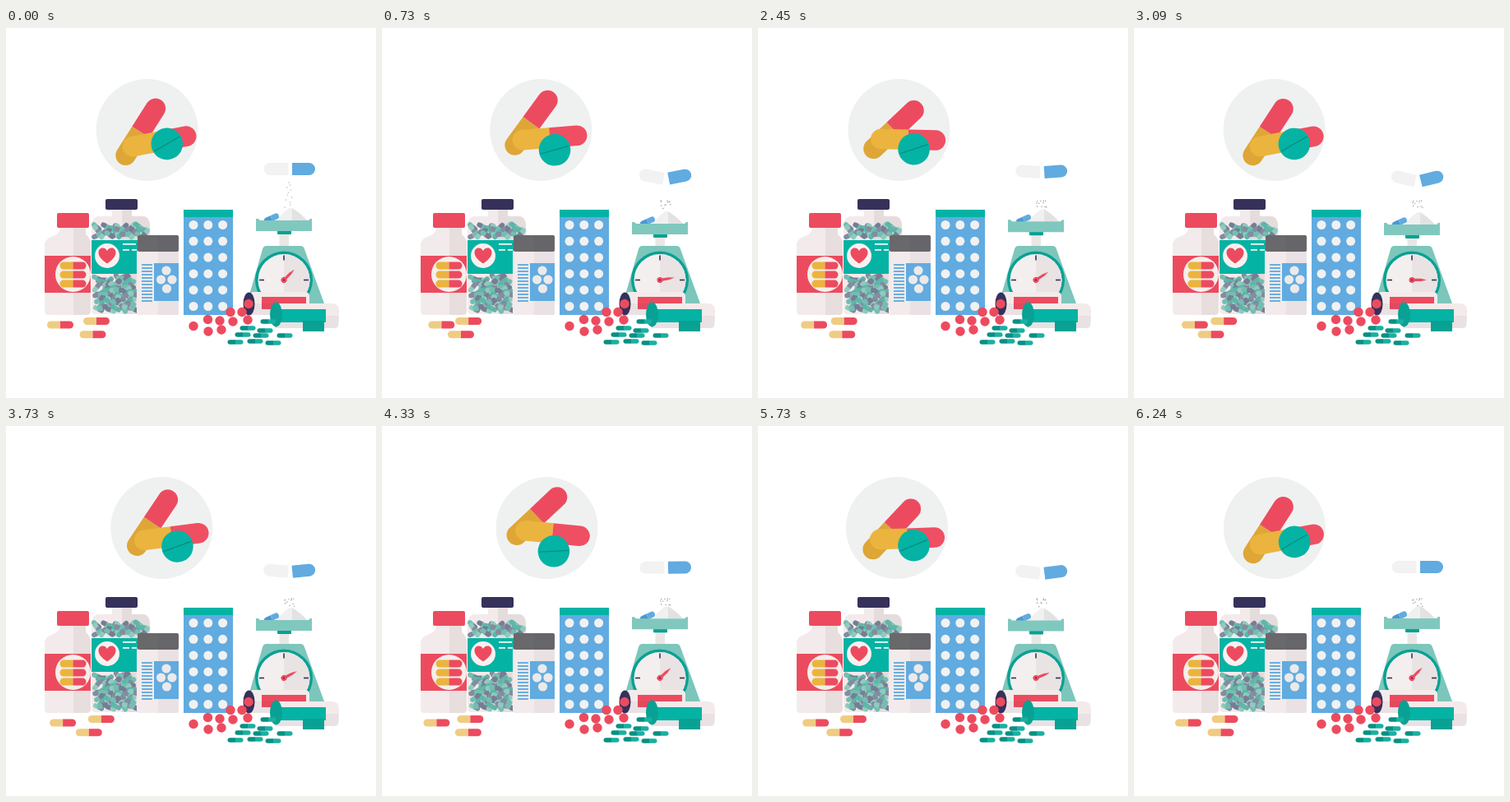
Recreate the animation shown at these times as an HTML page. Size 450 by 450 pixels, loop 6.27 s.

```html
<!DOCTYPE html>
<html lang="en">
<head>
<meta charset="utf-8">
<style>
html, body { margin: 0; width: 100%; height: 100%; overflow: hidden; background: #fff; }
svg { display: block; width: 100vw; height: 100vh; }
</style>
</head>
<body>
<svg id="stage" viewBox="0 0 450 450"></svg>
<script>
const LOOP = 6270, TAU = Math.PI * 2;
const C = {
  red: '#ec4b5f', yellow: '#ebb43e', teal: '#04b3a4', deep: '#08a193', blue: '#61abe0',
  navy: '#35315a', white: '#f3ebeb', grey: '#69686b', pale: '#eff1f1'
};

const rect = (x, y, w, h, fill, r = 0, extra = '') =>
  `<rect x="${x}" y="${y}" width="${w}" height="${h}" rx="${r}" fill="${fill}" ${extra}/>`;
const disc = (x, y, r, fill) => `<circle cx="${x}" cy="${y}" r="${r}" fill="${fill}"/>`;
const oval = (x, y, rx, ry, fill) => `<ellipse cx="${x}" cy="${y}" rx="${rx}" ry="${ry}" fill="${fill}"/>`;
const path = (d, fill, extra = '') => `<path d="${d}" fill="${fill}" ${extra}/>`;
const shade = (x, y, w, h) => rect(x, y, w, h, '#302d50', 0, 'opacity=".05"');
const group = (id, body) => `<g id="${id}">${body}</g>`;

// Two-coloured capsule centred on the origin.
function capsule(len, r, left, right) {
  const c = len / 2 - r;
  return path(`M0 ${-r}H${-c}a${r} ${r} 0 0 0 0 ${2 * r}H0z`, left) +
    path(`M0 ${-r}H${c}a${r} ${r} 0 0 1 0 ${2 * r}H0z`, right);
}
const at = (x, y, body, turn = 0) => `<g transform="translate(${x} ${y}) rotate(${turn})">${body}</g>`;

let seed = 17;
const random = () => (seed = (seed * 16807) % 2147483647) / 2147483647;

// Capsules tumbled over a loose grid.
function scatter(x, y, w, h, cols, rows) {
  const tones = ['#74beb1', '#777d95', '#5fb5a7', '#858ba0', '#8fcabf'];
  let out = '';
  for (let i = 0; i < cols * rows; i++) {
    const px = x + (i % cols + random()) * w / cols, py = y + (Math.floor(i / cols) + random()) * h / rows;
    out += at(px, py, capsule(14, 3, tones[i % 5], tones[(i * 3 + 1) % 5]), random() * 120 - 60);
  }
  return out;
}

function redBottle() {
  let out = path('M66 242H97V251Q103 255 103 264V344Q103 349 98 349H52Q47 349 47 344V264Q47 257 55 254Q66 251 66 242z', C.white);
  out += path('M82 242H97V251Q103 255 103 264V344Q103 349 98 349H82z', '#e8dede');
  out += rect(47, 277, 56, 45, C.red) + rect(62, 225, 39, 18, C.red, 2);
  out += disc(81.5, 299.5, 21.5, '#f5eeea');
  for (const y of [289, 300, 311]) out += at(81.5, y, capsule(32, 4.5, C.yellow, C.red));
  return out;
}

function heartBottle() {
  let out = path('M129 220H153V229H168Q175 231 175 241V343Q175 348 170 348H109Q104 348 104 343V241Q104 231 111 229H129z', C.white);
  out += path('M141 220H153V229H168Q175 231 175 241V348H141z', '#e5dcdd');
  out += scatter(110, 241, 60, 12, 9, 3) + scatter(110, 303, 46, 41, 7, 8);
  out += rect(104, 258, 70, 41, C.teal) + rect(121, 208, 39, 13, C.navy, 2);
  out += disc(123, 277, 15, '#f7f1f0');
  out += path('M123 286.500C115 281 112.500 277 112.500 273C112.500 267 120 265.500 123 271C126 265.500 133.500 267 133.500 273C133.500 277 131 281 123 286.500z', C.red);
  return out + rect(142, 262, 16, 1.8, '#e6f5f2') + rect(142, 269, 8, 1.8, '#e6f5f2') + rect(153, 269, 6, 1.8, '#e6f5f2');
}

function stripedBottle() {
  let out = rect(159, 270, 51, 79, C.white, 3) + rect(160, 252, 50, 20, C.grey, 2);
  out += shade(185, 252, 25, 97) + rect(180, 286, 30, 46, C.blue);
  for (let i = 0; i < 12; i++) out += rect(165, 287 + i * 4, 13, 2, '#69afe0');
  for (const [x, y] of [[195, 295], [188.5, 306], [202, 306], [195.5, 317]])
    out += disc(x, y, 5.6, '#ece9ea');
  return out;
}

function blister() {
  let out = rect(216, 221, 60, 128, C.blue) + rect(216, 221, 60, 9, C.teal);
  for (let i = 0; i < 18; i++)
    out += disc(228 + (i % 3) * 17.8, 239.5 + Math.floor(i / 3) * 19.8, 5.5, '#f1f1f1');
  return out;
}

function scale() {
  let out = rect(332.5, 245, 11.5, 22, '#ebe6e6');
  out += group('tray',
    path('M328 234Q337 225 342 221Q346 217 350 221Q358 226 366 234z', '#f0f0f0') +
    path('M348 219Q358 225 366 234H348z', '#e3e2e3') +
    at(323, 231.5, capsule(19, 3.5, '#4b98d4', C.blue), -25) +
    rect(330, 246, 17, 5, C.deep, 1) +
    path('M304 232H307L309 234H368L370 232H372V247H304z', '#80c8be'));
  out += path('M317 265H358Q362 265 363 269L387 335H293L312 269Q313 265 317 265z', '#7cc6bc');
  out += disc(338, 306.5, 35, C.deep) + disc(338, 306.5, 31.5, '#f4efef');
  out += path('M338 275A31.500 31.500 0 0 1 338 338z', '#e9e3e4');
  for (let i = 0; i < 4; i++) out += at(338, 306.5, rect(-.8, -30, 1.6, 6, C.navy), i * 90);
  out += group('needle', path('M-3 -1.7L11 -1.6L18 0L11 1.6L-3 1.7z', C.red) + disc(0, 0, 3.5, C.red) + disc(0, 0, 1, C.navy));
  return out;
}

function lyingBottles() {
  let out = rect(296, 321, 73, 28, C.white, 5) + rect(311, 327, 54, 15, C.red);
  out += shade(296, 335, 73, 14) + oval(295.5, 335.5, 7, 14, C.navy);
  out += path('M327 335H397Q405 336 405 343V357Q405 365 397 365H327z', C.white) + shade(327, 350, 77, 15);
  out += rect(331, 342, 58, 16, C.teal) + rect(361, 356, 26, 13, C.deep);
  return out + oval(328.5, 348.5, 7.5, 15, C.deep);
}

function looseMedicine() {
  let out = '';
  for (const [x, y] of [[228, 362.5], [245.5, 354.5], [246, 369], [260, 356], [262, 367],
    [276, 357], [273, 345.5], [287, 345.5], [294, 355], [295, 335.5]]) out += disc(x, y, 5.7, C.red);
  for (const [x, y] of [[294, 365], [319, 357], [315, 368], [288, 373], [310, 374], [339, 374], [279, 382], [303, 381], [325, 383]])
    out += at(x, y, capsule(19, 2.8, '#079083', '#19b0a1'));
  return out;
}

const small = capsule(32, 4.5, '#efcc82', C.red);
const drops = Array.from({ length: 11 }, () => '<circle class="drop"/>').join('');

const stage = document.getElementById('stage');
stage.innerHTML =
  group('badge', disc(0, 0, 62, C.pale) +
    group('back', capsule(92, 12.3, '#dea636', C.red)) +
    group('front', capsule(91, 12.3, C.yellow, '#ef4f62')) +
    group('tablet', disc(0, 0, 19.3, C.teal) + rect(-18, -.6, 36, 1.2, '#078c81'))) +
  heartBottle() + redBottle() + stripedBottle() + blister() + scale() + lyingBottles() + looseMedicine() +
  group('p1', small) + group('p2', small) + group('p3', small) + drops +
  group('halfL', path('M14 -7.500H-8.500a7.500 7.500 0 0 0 0 15H14z', '#f2f2f3')) +
  group('halfR', path('M-13 -7.500H7.500a7.500 7.500 0 0 1 0 15H-13z', C.blue));

const part = {};
stage.querySelectorAll('[id]').forEach(e => part[e.id] = e);
const dropList = [...stage.querySelectorAll('.drop')];
const place = (id, x, y, turn = 0) =>
  part[id].setAttribute('transform', `translate(${x} ${y}) rotate(${turn})`);

function draw(t) {
  const slow = t / (LOOP / 2), quick = t / (LOOP / 3);
  const sway = (mid, amp, peak) => mid + amp * Math.cos(TAU * (slow - peak));

  place('badge', sway(184.2, 16.4, .39), 124);
  place('back', sway(-9.3, -3, .33), sway(-5.8, -9, .43), sway(-47, 12, .58));
  place('front', sway(10.3, -4.7, .5), sway(10, -4, .46), sway(0, 11.5, .55));
  const angle = sway(57, 22, .495), rad = angle * Math.PI / 180;
  place('tablet', 29.5 * Math.cos(rad), 29.5 * Math.sin(rad), (angle - 78) * .7);

  const cos = Math.cos(TAU * quick), open = (1 - cos) / 2;
  place('p1', 70 - 4 * cos, 361);
  place('p2', 110 - 6 * Math.sin(TAU * quick), 356.5);
  place('p3', 99.5 + 6 * cos, 372.7);
  place('halfL', 329.5 - open, 171.5 + 11.5 * open, 14 * open);
  place('halfR', 361 + .5 * open, 171.5 + 11.5 * open, -14 * open);
  place('tray', 0, 5 * open);
  place('needle', 338, 306.5, -45 + 45 * open);

  // Powder falls early in each pour, then the last grains hop on the heap.
  const pour = (t / (LOOP / 5)) % 1;
  const falling = pour < .36;
  dropList.forEach((d, i) => {
    const u = (i / 11 + pour * 4) % 1;
    const hop = Math.sin(Math.PI * ((pour * 2 + i * .17) % 1));
    d.setAttribute('cx', falling ? 344 + 4 * Math.sin(i * 2.4) * (.4 + u) : 345 + 6 * Math.sin(i * 2.4));
    d.setAttribute('cy', falling ? 188 + 33 * u : 220 - 10 * hop);
    d.setAttribute('r', falling ? .8 : .7);
    d.setAttribute('fill', falling ? '#c3c1c5' : '#9a9094');
  });
}

const start = performance.now();
function tick() {
  draw((performance.now() - start) % LOOP);
  requestAnimationFrame(tick);
}
tick();
</script>
</body>
</html>
```
